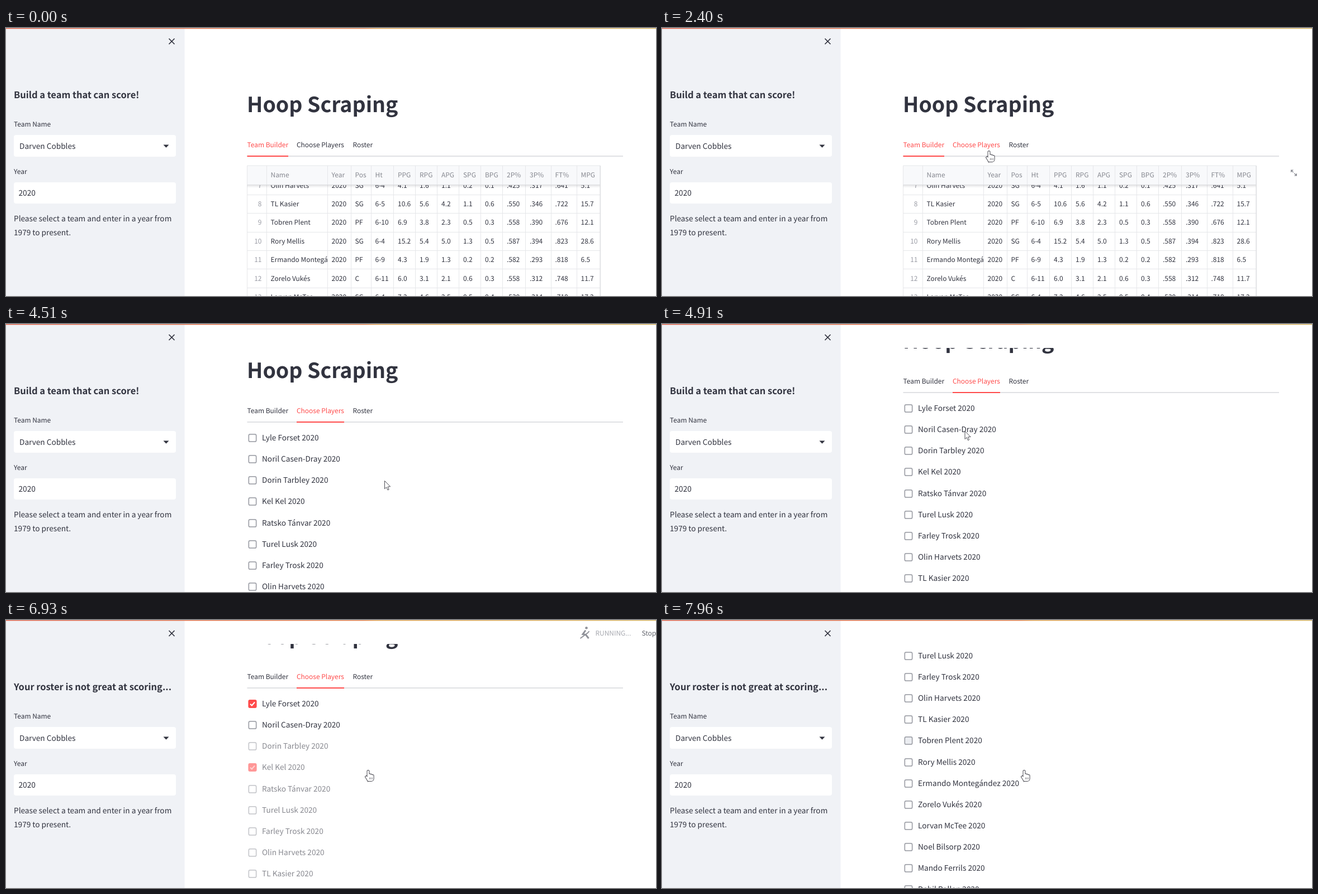
Write an HTML page with a canvas that moves like this. It is 1163x481 px and loops after 8000 ms.

```html
<!DOCTYPE html>
<html lang="en">
<head>
<meta charset="utf-8">
<title>Hoop Scraping</title>
<style>
html, body { margin: 0; width: 100%; height: 100%; overflow: hidden; background: #fff; }
canvas { display: block; }
</style>
</head>
<body>
<canvas id="stage" width="1163" height="481"></canvas>
<script>
const W = 1163, H = 481, LOOP = 8000;
const c = document.getElementById('stage').getContext('2d');
const FAMILY = '"Noto Sans CJK JP", "Noto Sans CJK SC", "Noto Sans", sans-serif';
const INK = '#31333f', RED = '#ff4b4b', GRAY = '#85878f', LINE = '#e6e7ea';
const BODY = 15.25, SMALL = 13.35;
const LEFT = 431.5, PITCH = 38.15, ROW = 33.4, FIRST_ROW = 7;

const players = ['Lyle Forset', 'Noril Casen-Dray', 'Dorin Tarbley', 'Kel Kel', 'Ratsko Tánvar',
  'Turel Lusk', 'Farley Trosk', 'Olin Harvets', 'TL Kasier', 'Tobren Plent', 'Rory Mellis',
  'Ermando Montegández', 'Zorelo Vukés', 'Lorvan McTee', 'Noel Bilsorp', 'Mando Ferrils', 'Dahil Pollan'];
const positions = ['SG', 'SG', 'PF', 'SG', 'PF', 'C', 'SG'];
const inches = { SG: 4, PF: 8, C: 11 };

// Header, width and, for statistics, the highest value; shares stay below 1.
const columns = [['', 34.5], ['Name', 109], ['Year', 42], ['Pos', 36], ['Ht', 40.5],
  ['PPG', 39, 20], ['RPG', 39, 9], ['APG', 39, 6], ['SPG', 39, 1.5], ['BPG', 39, 0.8],
  ['2P%', 41, 0.6], ['3P%', 45.5, 0.4], ['FT%', 46, 0.85], ['MPG', 42, 33]];

// Pointer moves: start, end, target x and y, whether it ends as a hand
const moves = [[460, 1220, 1127, 335], [1290, 1360, 1090, 322], [1560, 1920, 723, 206],
  [2120, 2390, 585, 221, true], [2940, 3740, 451, 250, true], [3820, 4080, 677, 281],
  [4640, 5050, 472, 146, true], [5640, 5840, 482, 228, true], [5900, 6390, 489, 262, true],
  [6460, 6790, 648, 270, true]];

const WHEEL = [4351, 6910, 7144, 7780], NOTCH = 107, GLIDE = 320;
const TAB_CLICK = 2940, FIRST_CHECK = 5700, SECOND_CHECK = 6380;
const RUN_START = 5770, NEW_HEADING = 6640, STALE = 6925, RUN_END = 7640;

const clamp = u => Math.max(0, Math.min(1, u));
const smooth = u => (u = clamp(u), u * u * (3 - 2 * u));
const scrollAt = t => Math.round(WHEEL.reduce((sum, s) => sum + NOTCH * smooth((t - s) / GLIDE), 0));

function random(seed) {
  return () => (seed = seed * 16807 % 2147483647) / 2147483647;
}

function makeRows() {
  const rnd = random(2020);
  return positions.map((pos, i) => {
    const share = 0.2 + 0.7 * rnd();
    const stats = columns.slice(5).map(([, , max]) => {
      if (max < 1 && max !== 0.8) return (max * (0.7 + 0.3 * rnd())).toFixed(3).slice(1);
      return (max * share * (0.7 + 0.4 * rnd())).toFixed(1);
    });
    const height = inches[pos] + (pos === 'C' ? 0 : i % 3);
    return [FIRST_ROW + i, players[FIRST_ROW + i], '2020', pos, '6-' + height, ...stats];
  });
}
const rows = makeRows();

function rect(x, y, w, h, color) {
  c.fillStyle = color;
  c.fillRect(x, y, w, h);
}

function round(x, y, w, h, r, color) {
  c.fillStyle = color;
  c.beginPath();
  c.roundRect(x, y, w, h, r);
  c.fill();
}

// Sizes are for Source Sans; the CJK family draws the same Latin 1.117 times larger.
function text(s, x, y, size = BODY, color = INK, weight = 400, align = 'left') {
  c.font = `${weight} ${size / 1.117}px ${FAMILY}`;
  c.textAlign = align;
  c.fillStyle = color;
  c.fillText(s, x, Math.round(y));
}

function poly(points, close) {
  c.beginPath();
  for (let i = 0; i < points.length; i += 2) c.lineTo(points[i], points[i + 1]);
  if (close) c.closePath();
}

function shape(points, color) {
  c.fillStyle = color;
  poly(points, true);
  c.fill();
}

function stroke(points, width, color) {
  c.strokeStyle = color;
  c.lineWidth = width;
  poly(points);
  c.stroke();
}

function disc(x, y, r, open) {
  c.beginPath();
  c.arc(x, y, r, 0, 7);
  open ? c.stroke() : c.fill();
}

function at(x, y, paint) {
  c.save();
  c.translate(x, y);
  paint();
  c.restore();
}

function sidebar(t) {
  rect(0, 0, 319.5, H, '#f0f2f6');
  at(296.5, 24, () => {
    for (const d of [-5, 5]) stroke([-5, -d, 5, d], 1.7, INK);
  });
  const heading = t < NEW_HEADING ? 'Build a team that can score!' : 'Your roster is not great at scoring...';
  text(heading, 14, 126, 18.4, INK, 600);
  text('Team Name', 14, 177, SMALL);
  round(14, 192, 290, 39, 4, '#fff');
  text('Darven Cobbles', 24, 217);
  shape([281.5, 209.5, 291.5, 209.5, 286.5, 214.7], INK);
  text('Year', 14, 262, SMALL);
  round(14, 277, 290, 38, 4, '#fff');
  text('2020', 22.5, 301);
  text('Please select a team and enter in a year from', 14, 347);
  text('1979 to present.', 14, 372);
}

function tabs(t, y) {
  text('Team Builder', LEFT, y + 4, SMALL, t < TAB_CLICK ? RED : INK);
  text('Choose Players', 520, y + 4, SMALL, t < 2320 ? INK : RED);
  text('Roster', 620.5, y + 4, SMALL);
  rect(LEFT, y + 19, 672.5, 2, '#e0e1e4');
  const u = smooth((t - TAB_CLICK) / 300);
  rect(LEFT + 88.5 * u, y + 19, 73.5 + 11.5 * u, 2, RED);
}

function tableRow(cells, y, color) {
  let x = LEFT;
  columns.forEach(([, width], i) => {
    c.save();
    c.beginPath();
    c.rect(x, 240, width, H);
    c.clip();
    if (i) text(cells[i], x + 7.5, y, SMALL, color);
    else text(cells[i], x + 26, y, SMALL, '#9a9ca5', 400, 'right');
    c.restore();
    x += width;
  });
}

function table() {
  const width = columns.reduce((sum, col) => sum + col[1], 0);
  rows.forEach((cells, r) => {
    const mid = 282.2 + r * ROW;
    tableRow(cells, mid + 4.3, INK);
    rect(LEFT, Math.round(mid + 16.5), width, 1, LINE);
  });
  rect(LEFT, 247, width, 34, '#f8f9fb');
  tableRow(columns.map(col => col[0]), 268, GRAY);
  let x = LEFT;
  for (const [, w] of columns) {
    rect(Math.floor(x), 247, 1, H, LINE);
    x += w;
  }
  rect(LEFT, 246.5, width, 1, LINE);
  rect(LEFT, 281, width, 1, '#dcdde0');
  const shade = c.createLinearGradient(0, 282, 0, 287);
  shade.addColorStop(0, 'rgba(60,60,70,.13)');
  shade.addColorStop(1, 'rgba(60,60,70,0)');
  rect(LEFT, 282, width, 5, shade);
  rect(x - 0.5, 247, 1.5, H, '#dcdde0');
}

function expandIcon() {
  for (const side of [-1, 1]) {
    at(1130.5, 260, () => {
      c.scale(side, side);
      shape([5.5, 5.5, 0.5, 5.5, 5.5, 0.5], '#8f9198');
      stroke([0.8, 0.8, 4.5, 4.5], 1.4, '#8f9198');
    });
  }
}

function checkbox(checked, hover) {
  if (checked) {
    round(-7.6, -7.6, 15.2, 15.2, 3, RED);
    stroke([-4, 0.2, -1.1, 3, 4, -3], 2, '#fff');
    return;
  }
  round(-6.7, -6.7, 13.4, 13.4, 2.5, hover ? '#eceef2' : '#fff');
  c.lineWidth = 1.8;
  c.strokeStyle = '#a3a5ac';
  c.stroke();
}

function list(t, scroll) {
  const stale = t >= STALE && t < RUN_END;
  const fresh = 2 + Math.floor((t - STALE) / 46.7);
  const faded = Math.max(0.33, 0.58 - (t - STALE) / 1870);
  players.forEach((name, i) => {
    const y = Math.round(258 + i * PITCH - scroll);
    c.globalAlpha = stale && i >= fresh ? faded : 1;
    const checked = i === 0 && t >= FIRST_CHECK || i === 3 && t >= SECOND_CHECK;
    at(441, y + 0.5, () => checkbox(checked, i === 9 && t >= RUN_END));
    text(name + ' 2020', 458, y + 5);
    c.globalAlpha = 1;
  });
}

const poses = [
  function person(color) {
    disc(0, -7.7, 2.3);
    stroke([-8, -3, 8, -3], 2.2, color);
    rect(-3.3, -4, 6.6, 8, color);
    for (const x of [-2.2, 2.2]) stroke([x, 2, x, 10.5], 2.2, color);
  },
  function cyclist(color) {
    for (const x of [-7, 7]) disc(x, 5.5, 4.3, true);
    disc(2.5, -8.2, 2.1);
    stroke([0.5, 9, 0.5, 3.5, -3.5, 0, 0.5, -4.3, 4, -1, 8.5, -1], 2, color);
  },
  function rower(color) {
    disc(3.5, -8.7, 2.3);
    stroke([2, -4.5, -3, 2.5, 2.5, 3.5, 7.5, 10], 3, color);
    stroke([8.5, -3, 6, 0, -7.5, 10], 1.8, color);
  }
];

function status(t) {
  if (t < RUN_START || t >= RUN_END) return;
  const color = '#909299';
  c.globalAlpha = clamp(0.62 + (t - 5840) / 500);
  at(1035, 23, () => {
    c.fillStyle = c.strokeStyle = color;
    c.lineWidth = 1.6;
    poses[Math.floor((t - RUN_START) / 400) % 3](color);
  });
  text('RUNNING...', 1054.5, 28, SMALL, '#a6a8af');
  text('Stop', 1137.5, 28, SMALL, '#65676f');
  c.globalAlpha = 1;
}

function hand() {
  c.beginPath();
  c.roundRect(-1.5, 0, 3, 14, 1.5);
  for (let i = 1; i < 4; i++) c.roundRect(2.7 * i - 1.5, 5.5 + 0.8 * i, 3, 8, 1.5);
  c.roundRect(-1.5, 10, 11, 9, [0, 0, 4, 2]);
  c.moveTo(-1, 18);
  c.lineTo(-5, 11.5);
  c.lineTo(-3.3, 10);
  c.lineTo(-1, 12.5);
  c.closePath();
  c.stroke();
  c.fill();
  for (let i = 0; i < 3; i++) rect(2 + 2.4 * i, 12.5, 0.8, 3.5, '#66666c');
}

function arrow() {
  poly([0.5, 0.5, 0.5, 14.8, 3.7, 11.9, 6, 17, 8.2, 16, 6, 11.1, 10.6, 10.8], true);
  c.fill();
  c.stroke();
}

function cursor(t) {
  let x = 1160, y = 478, isHand = false;
  for (const [start, end, tx, ty, endsAsHand = false] of moves) {
    if (t < start) break;
    const u = clamp((t - start) / (end - start));
    x += (tx - x) * u;
    y += (ty - y) * u;
    if (u > 0.7) isHand = endsAsHand;
  }
  // Hovering is lost for a moment after each turn of the wheel.
  if (WHEEL.some(s => t > s + 200 && t < s + 450)) isHand = false;
  at(x, y, () => {
    c.fillStyle = '#fff';
    c.strokeStyle = '#4c4c54';
    c.lineWidth = isHand ? 2 : 1;
    isHand ? hand() : arrow();
  });
}

function topBar() {
  const g = c.createLinearGradient(0, 0, W, 0);
  g.addColorStop(0, '#e0644c');
  g.addColorStop(0.55, '#e27f4b');
  g.addColorStop(0.57, '#dfa14f');
  g.addColorStop(1, '#d9b765');
  rect(0, 0, W, 1.4, g);
}

function draw(t) {
  const scroll = scrollAt(t);
  rect(0, 0, W, H, '#fff');
  c.save();
  c.beginPath();
  c.rect(320, 43, W - 320, H - 43);
  c.clip();
  text('Hoop Scraping', 431, 151 - scroll, 41.9, INK, 700);
  tabs(t, 210 - scroll);
  if (t < TAB_CLICK) table();
  else list(t, scroll);
  c.restore();
  if (t >= 1290 && t < 2600) expandIcon();
  sidebar(t);
  status(t);
  topBar();
  if (t >= moves[0][0]) cursor(t);
}

c.textRendering = 'geometricPrecision';
const begin = performance.now();
function tick() {
  draw((performance.now() - begin) % LOOP);
  requestAnimationFrame(tick);
}
tick();
</script>
</body>
</html>
```
